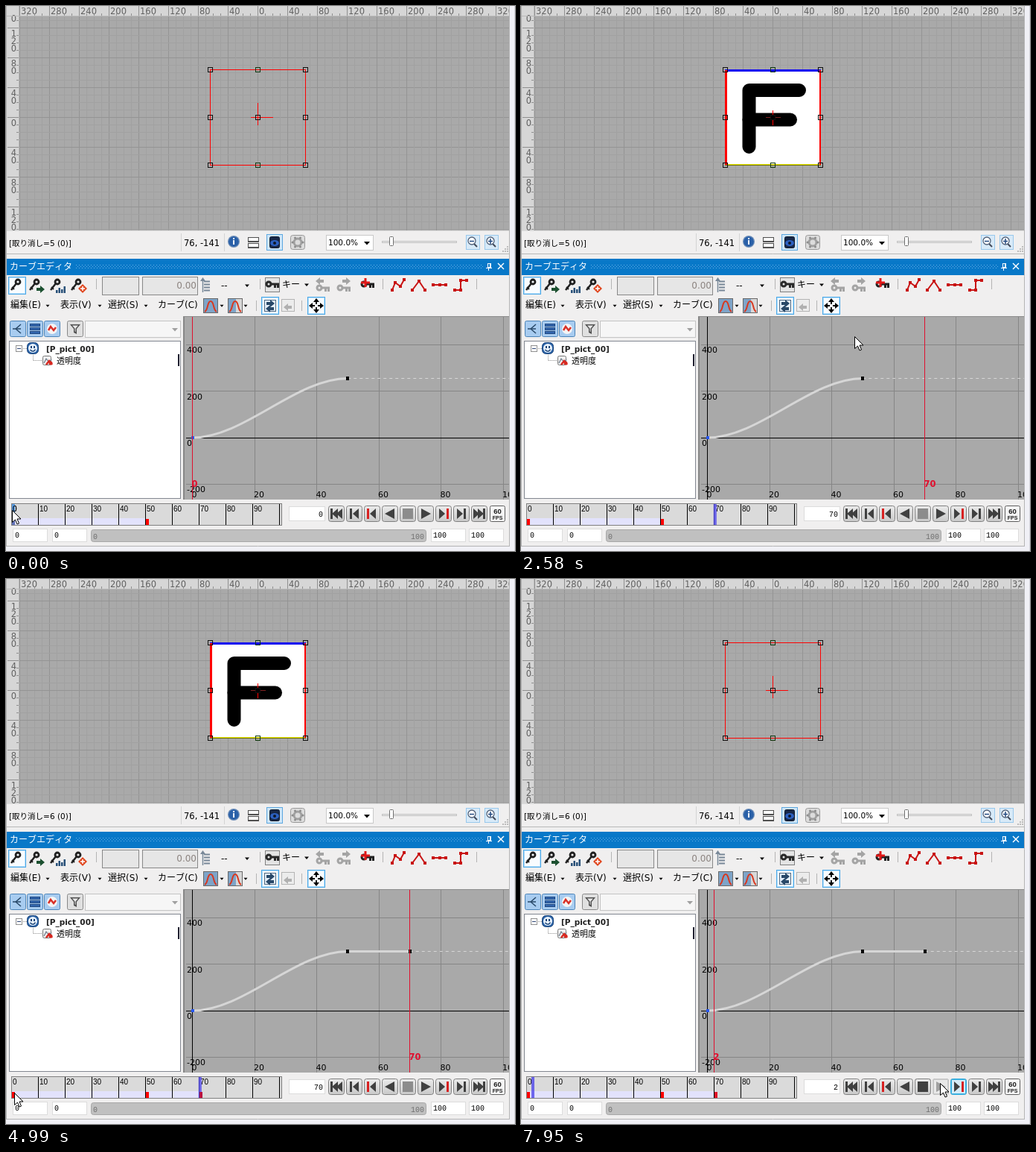
An HTML page with a canvas that plays this animation: 684 by 731 pixels, repeating every 8000 ms.

```html
<!DOCTYPE html>
<html lang="ja">
<head>
<meta charset="utf-8">
<title>カーブエディタ</title>
<style>
html, body { margin: 0; width: 100%; height: 100%; overflow: hidden; background: #f0f0f0; }
canvas { display: block; }
</style>
</head>
<body>
<canvas id="stage" width="684" height="731"></canvas>
<script>
const W = 684, H = 731, LOOP = 8000, STEP = 77.9;
const UI = "'DejaVu Sans','Noto Sans CJK JP','Noto Sans CJK',sans-serif";
const SMALL = "'Liberation Sans',sans-serif";
const MONO = "'Liberation Mono',monospace";
const RED = '#c81414', DARK = '#404040';
const screen = document.getElementById('stage').getContext('2d');
const base = document.createElement('canvas');
base.width = W; base.height = H;
let g = base.getContext('2d');

// Drawing helpers
function box(x, y, w, h, fill, edge) {
  if (fill) { g.fillStyle = fill; g.fillRect(x, y, w, h); }
  if (edge) { g.strokeStyle = edge; g.lineWidth = 1; g.strokeRect(x + .5, y + .5, w - 1, h - 1); }
}
function round(x, y, w, h, r, fill, edge) {
  g.beginPath(); g.roundRect(x + .5, y + .5, w - 1, h - 1, r);
  g.fillStyle = fill; g.fill();
  g.strokeStyle = edge; g.lineWidth = 1; g.stroke();
}
function trace(p) {
  g.beginPath();
  for (let i = 0; i < p.length; i += 2) g.lineTo(p[i], p[i + 1]);
}
function line(p, color, w = 1, dash = []) {
  trace(p);
  g.strokeStyle = color; g.lineWidth = w; g.setLineDash(dash); g.stroke(); g.setLineDash([]);
}
function poly(p, color) { trace(p); g.closePath(); g.fillStyle = color; g.fill(); }
function disc(x, y, r, color) { g.beginPath(); g.arc(x, y, r, 0, 7); g.fillStyle = color; g.fill(); }
function ring(x, y, r, color, w) { g.beginPath(); g.arc(x, y, r, 0, 7); g.strokeStyle = color; g.lineWidth = w; g.stroke(); }
function text(s, x, y, size, color = '#000', font = UI, align = 'left', weight = '') {
  g.font = `${weight} ${size}px ${font}`;
  g.textAlign = align; g.fillStyle = color; g.fillText(s, x, y);
}
function shade(y, h, a, b) {
  const s = g.createLinearGradient(0, y, 0, y + h);
  s.addColorStop(0, a); s.addColorStop(1, b);
  return s;
}
const drop = (x, y, c = '#000', r = 3) => poly([x - r, y - r / 2, x + r, y - r / 2, x, y + r / 2 + .5], c);
const divider = (x, y) => line([x + .5, y, x + .5, y + 14], '#b4b4b4');
const picked = (x, y, w = 24) => { box(x, y, w, 24, '#f8fcff', '#4aa8e8'); box(x + 1, y + 1, w - 2, 22, null, '#b8e0fa'); };
function slantKey(x, y) {
  ring(x + 3, y - 4, 3, '#202020', 2.8);
  line([x + 1, y - 2, x - 6, y + 7], '#202020', 2.5);
  line([x - 5, y + 3, x - 2, y + 6], '#202020', 2);
}
function flatKey(x, y, c) {
  ring(x + 4, y, 3, c, 3);
  line([x + 8, y, x + 18, y], c, 3);
  line([x + 12.5, y, x + 12.5, y + 5], c, 3);
  line([x + 16.5, y, x + 16.5, y + 5], c, 3);
}
function arrow(x, y, d, c) {
  poly([x - 5 * d, y - 2, x, y - 2, x, y - 5, x + 6 * d, y, x, y + 5, x, y + 2, x - 5 * d, y + 2], c);
}

function drawStage() {
  box(1, 0, 675, 302, '#a9a9a9');
  for (let i = -34; i <= 34; i++) {
    const x = 338.5 + i * 10, y = 149.5 + i * 10, c = i % 4 ? '#a1a1a1' : '#949494';
    if (x > 18) line([x, 13, x, 301], c);
    if (y > 13 && y < 301) line([18, y, 676, y], c);
  }
  box(1, 0, 675, 13, '#d6d6d6');
  box(1, 0, 17, 301, '#d6d6d6');
  for (let i = -32; i <= 33; i++) {
    const x = 338.5 + i * 10, y = 149.5 + i * 10, major = i % 4 === 0;
    line([x, major ? 0 : 10, x, 13], '#909090');
    if (y > 13 && y < 301) line([major ? 2 : 14, y, 18, y], '#909090');
    if (!major) continue;
    const label = String(Math.abs(i * 10));
    text(label, x + 1.5, 11, 11.5, '#606060');
    if (Math.abs(i) <= 16) [...label].forEach((d, k) => {
      const b = y + 11 + k * 10;
      if (b > 14 && b < 306) text(d, 10.5, b, 11.5, '#606060', UI, 'center');
    });
  }
  line([1, 13.5, 676, 13.5], '#b8b8b8');
  line([17.5, 0, 17.5, 301], '#b8b8b8');
  box(0, 301, W, 38, '#f0efef');
  line([1, 301.5, 676, 301.5], '#dcdcdc');
}

function drawStatus() {
  for (const x of [235.5, 293.5]) line([x, 305, x, 329], '#d4d4d4');
  text('76, -141', 239, 322, 11.5);
  disc(306, 316, 8, '#6f8fb8'); disc(306, 316, 6.8, '#2a60a8');
  box(305, 311, 2, 2, '#fff'); box(305, 314, 2, 6, '#fff');
  for (const y of [310, 318]) box(325, y, 15, 7, '#fafafa', '#505050');
  box(325, 315, 15, 2, '#505050'); box(325, 323, 15, 2, '#505050');
  box(350, 306, 22, 22, '#cfe6f8', '#5ca8e0');
  round(354, 309, 14, 16, 2, '#182848', '#101828');
  g.beginPath(); g.ellipse(361, 318, 6, 4, 0, 0, 7); g.fillStyle = '#2c60c0'; g.fill();
  disc(361, 318, 2, '#101828');
  round(382, 307, 20, 20, 3, '#dcdcdc', '#989898');
  ring(392, 317, 5, '#a0a0a0', 3);
  for (let k = 0; k < 6; k++) disc(392 + 7 * Math.cos(k * 1.047), 317 + 7 * Math.sin(k * 1.047), 1.5, '#8c8c8c');
  box(430, 307, 64, 21, '#fff', '#c8c8c8');
  text('100.0%', 433, 321, 10.5); drop(485, 318, '#000', 4);
  box(505, 315, 101, 3, '#e4e4e4', '#c4c4c4');
  round(515, 309, 6, 13, 1, '#fff', '#707070');
  for (const x of [618, 643]) {
    box(x, 307, 19, 20, '#d8eaf8', '#98c8ec');
    line([x + 11, 319, x + 15, 323], '#404858', 2);
    disc(x + 8, 315, 5, '#fff'); ring(x + 8, 315, 5, '#506078', 1.3);
    line([x + 5, 315.5, x + 11, 315.5], '#204880', 1.5);
    if (x > 630) line([x + 8, 312, x + 8, 319], '#204880', 1.5);
  }
  for (let i = 0; i < 3; i++) for (let j = 0; j <= i; j++) box(673 - j * 3, 322 + i * 3, 2, 2, '#bcbcbc');
  line([0, 332.5, 677, 332.5], '#b8b8b8');
}

function drawTitle() {
  box(1, 339, 675, 22, '#0878c8');
  text('カーブエディタ', 5, 354, 12, '#fff');
  for (let x = 94; x < 640; x += 4) {
    box(x, 347, 1, 1, '#62b0e6'); box(x + 2, 349, 1, 1, '#62b0e6'); box(x, 351, 1, 1, '#62b0e6');
  }
  box(647, 345, 5, 6, null, '#fff'); box(650, 345, 1, 6, '#fff');
  line([645, 351.5, 653, 351.5], '#fff'); line([648.5, 352, 648.5, 355], '#fff');
  line([661, 345, 669, 353], '#fff', 1.5); line([669, 345, 661, 353], '#fff', 1.5);
}

function drawTools() {
  picked(3, 363);
  [13, 38, 66, 94].forEach(x => slantKey(x, 374));
  arrow(46, 380, 1, '#1c5030');
  [4, 7, 5, 9].forEach((h, i) => box(67 + i * 3.5, 385 - h, 2.5, h, '#285078'));
  poly([103, 373, 109, 379, 103, 385, 97, 379], '#e04820');
  line([103, 376, 103, 382], '#fff', 1.5); line([100, 379, 106, 379], '#fff', 1.5);
  [121, 341, 506, 632].forEach(x => divider(x, 366));
  box(129, 363, 50, 25, '#e6e6e6', '#888');
  box(183, 363, 75, 25, '#e6e6e6', '#888');
  text('0.00', 256, 379, 12, '#8c8480', UI, 'right');
  for (let y = 369; y < 384; y += 4) line([266, y + .5, 274, y + .5], '#788898', 2);
  line([264.5, 366, 264.5, 384], '#788898', 1.5); poly([261, 369, 264.5, 364, 268, 369], '#788898');
  text('--', 289, 379, 12); drop(324, 375);
  box(348, 364, 20, 20, '#e4e4e4', '#808080'); flatKey(349, 373, '#282828');
  text('キー', 371, 378, 12); drop(404, 374);
  flatKey(417, 378, '#a4a4a4'); arrow(422, 369, -1, '#a4a4a4');
  flatKey(445, 378, '#a4a4a4'); arrow(457, 369, 1, '#a4a4a4');
  const curves = [[519, 381, 523, 371, 530, 376, 535, 367], [546, 381, 555, 369, 563, 381],
    [574, 374, 583, 374, 591, 374], [603, 381, 611, 381, 611, 368, 619, 368]];
  for (const c of curves) {
    line(c, RED, 2);
    for (let i = 0; i < c.length; i += 2) box(c[i] - 2, c[i + 1] - 2, 4, 4, RED);
  }
  [['編集(E)', 6], ['表示(V)', 73], ['選択(S)', 137], ['カーブ(C)', 204]].forEach(([s, x]) => text(s, x, 405, 12));
  [56, 126, 188, 290, 322].forEach(x => drop(x, 402, '#000', 2.5));
  for (const x of [265, 298]) {
    box(x, 392, 20, 20, '#7ea4c8', '#686868');
    if (x > 270) box(x + 11, 393, 8, 18, '#d8d8d8');
    g.beginPath(); g.moveTo(x + 2, 410);
    g.bezierCurveTo(x + 7, 408, x + 5, 396, x + 10, 396);
    g.bezierCurveTo(x + 15, 396, x + 13, 408, x + 18, 410);
    g.strokeStyle = '#d83820'; g.lineWidth = 2; g.stroke();
  }
  divider(336, 395); divider(397, 395);
  picked(343, 390);
  box(347, 394, 16, 16, '#e4eef8', '#506880');
  arrow(355, 399, 1, '#284868'); arrow(355, 406, -1, '#284868');
  box(370, 393, 18, 17, '#ececec', '#b4b4b4'); arrow(379, 404, -1, '#b0b0b0');
  picked(405, 390);
  for (let k = 0; k < 4; k++) {
    g.save(); g.translate(417, 402); g.rotate(k * Math.PI / 2);
    poly([5, -4, 10, 0, 5, 4], '#000'); box(2, -1, 3, 2, '#000');
    g.restore();
  }
}

function drawTree() {
  [5, 28, 51, 82].forEach((x, i) => round(x, 422, 22, 22, 2, i < 3 ? '#a8ccf0' : '#e0e0e0', i < 3 ? '#4c84b8' : '#888'));
  line([9, 433, 13, 433, 20, 427], '#284868', 1.5); line([13, 433, 20, 433], '#284868', 1.5); line([13, 433, 20, 439], '#284868', 1.5);
  for (let y = 426; y < 440; y += 5) box(32, y, 14, 4, '#3468b0', '#204880');
  disc(62, 433, 7, '#f4f4f4');
  line([57, 435, 60, 430, 64, 435, 67, 431], '#d83028', 2.5);
  poly([86, 427, 100, 427, 95, 433, 95, 440, 91, 438, 91, 433], '#505050');
  poly([89, 428.5, 97, 428.5, 93.5, 432.5, 93.5, 437, 92.5, 436.5, 92.5, 432.5], '#e8e8e8');
  box(106, 422, 129, 23, '#f6f6f6', '#c4c4c4'); drop(227, 434, '#a0a0a0', 4);
  box(4, 449, 231, 212, '#fff', '#828790');
  box(231, 467, 2, 16, '#202030');
  box(13, 455, 9, 9, '#fff', '#909090'); line([15, 459.5, 20, 459.5], '#304878');
  line([23, 459.5, 28, 459.5], '#909090', 1, [1, 1]);
  line([36.5, 468, 36.5, 475.5, 48, 475.5], '#909090', 1, [1, 1]);
  round(28, 451, 16, 16, 5, '#2c64a8', '#1c4478');
  disc(36, 459, 6, '#e8f2fc'); box(33, 456, 2, 3, '#1c4478'); box(37, 456, 2, 3, '#1c4478');
  g.beginPath(); g.arc(36, 459.5, 3.5, .3, 2.8); g.strokeStyle = '#1c4478'; g.lineWidth = 1.5; g.stroke();
  text('[P_pict_00]', 54, 464, 10.5, '#202020', UI, 'left', 'bold');
  round(49, 469, 12, 13, 2, '#f0f0f0', '#787878');
  line([51, 479, 54, 473, 58, 478, 61, 474], '#687888', 1.2);
  line([54, 481, 58, 476, 62, 481], '#d82820', 2.5); disc(60, 479, 2.5, '#d82820');
  text('透明度', 68, 480, 11);
}

const gx = n => 250.5 + n * 4.175, gy = v => 579 - v * .312;

function drawGraph() {
  box(238, 416, 438, 246, '#a9a9a9');
  box(238, 416, 2, 246, '#868686');
  box(238, 416, 438, 1, '#8c8c8c');
  for (let n = 20; n <= 100; n += 20) {
    const x = Math.floor(gx(n)) + .5;
    line([x, 417, x, 662], '#868686');
  }
  for (const v of [400, 200, -200]) {
    const y = Math.floor(gy(v)) + .5;
    line([242, y, 676, y], '#868686');
  }
  line([242, 579.5, 676, 579.5], '#000'); line([250.5, 417, 250.5, 662], '#000');
  [400, 200, 0, -200].forEach(v => text(v, 243, gy(v) + 11, 11));
  for (let n = 0; n <= 100; n += 20) text(n, gx(n) - 1, 659, 11);
  g.beginPath(); g.moveTo(gx(0), gy(0));
  g.bezierCurveTo(gx(50 / 3), gy(0), gx(100 / 3), gy(255), gx(50), gy(255));
  g.strokeStyle = '#d6d6d6'; g.lineWidth = 3; g.stroke();
  box(249, 577, 4, 4, '#2858f0');
}

function navButton(i, kind, fill, edge, ink = DARK) {
  const x = 433 + i * 24, c = x + 11, y = 681;
  round(x, 670, 22, 22, 3, fill || shade(670, 22, '#ececec', '#c8c8c8'), edge || '#808080');
  if (edge) box(x + 1, 671, 20, 20, null, edge);
  const left = a => poly([a + 8, y - 7, a, y, a + 8, y + 7], ink);
  const right = a => poly([a, y - 7, a + 8, y, a, y + 7], ink);
  const bar = (a, col = ink) => box(a, y - 7, 3, 14, col);
  ({
    first() { bar(x + 3); left(x + 5); left(x + 11); },
    prev() { bar(x + 5); left(x + 9); },
    prevKey() { bar(x + 4, '#d82020'); left(x + 8); },
    back() { poly([c - 7, y, c + 6, y - 7, c + 6, y + 7], ink); },
    stop() { box(c - 7, y - 7, 14, 14, ink); },
    play() { poly([c + 7, y, c - 6, y - 7, c - 6, y + 7], ink); },
    nextKey() { right(x + 5); bar(x + 15, '#d82020'); },
    next() { right(x + 5); bar(x + 14); },
    last() { right(x + 3); right(x + 9); bar(x + 16); }
  })[kind]();
}

function drawFooter() {
  ['first', 'prev', 'prevKey', 'back', 'stop', 'play', 'nextKey', 'next', 'last']
    .forEach((k, i) => navButton(i, k, null, null, k === 'stop' ? '#8c8c8c' : DARK));
  round(650, 670, 21, 22, 2, '#f4f4f4', '#606060');
  text('60', 660.5, 681, 9.5, '#202020', SMALL, 'center', 'bold');
  text('FPS', 660.5, 689, 7, '#202020', SMALL, 'center', 'bold');
  box(380, 671, 49, 20, '#fff', '#dcdcdc');
  round(114, 702, 451, 17, 3, '#c0c0c0', '#a8a8a8');
  text('0', 117, 715, 10, '#707070', MONO); text('100', 562, 715, 10, '#707070', MONO, 'right');
  [[9, '0'], [62, '0'], [571, '100'], [622, '100']].forEach(([x, s]) => {
    box(x, 701, 47, 18, '#fff', '#dcdcdc'); text(s, x + 3, 713, 10, '#000', MONO);
  });
  line([0, 724.5, 677, 724.5], '#b4b4b4');
  box(0, 725, W, 6, '#f0f0f6');
}

function drawBase() {
  box(0, 0, W, H, '#f0efef');
  drawStage(); drawStatus(); drawTitle(); drawTools(); drawTree(); drawGraph(); drawFooter();
  box(676, 0, 8, H, '#f0f0f6');
  line([676.5, 0, 676.5, 725], '#b4b4b4'); line([683.5, 0, 683.5, H], '#d8d8e0');
  line([.5, 0, .5, 725], '#b4b4b4');
}

// Motion: [step, value...]
const frames = [[0, 0], [1, 2], [2, 8], [4, 27], [6, 43], [8, 55], [11, 66], [13, 68], [15, 68], [17, 70],
  [64, 70], [65, 1], [83, 1], [84, 0], [101, 0], [102, 2]];
const pointer = [[0, 8, 676], [1, 16, 678], [2, 38, 680], [4, 106, 683], [6, 164, 684], [8, 207, 685], [11, 247, 687],
  [17, 262, 688], [28, 262, 688], [33, 448, 443], [35, 448, 443], [36, 451, 456], [38, 480, 410], [40, 497, 376],
  [41, 484, 365], [46, 484, 365], [49, 380, 480], [52, 130, 690], [54, 45, 712], [58, 11, 697], [59, 11, 697],
  [61, 16, 693], [64, 11, 689], [67, 11, 689], [70, 84, 685], [72, 30, 686], [77, 11, 687], [79, 6, 687],
  [86, 6, 687], [88, 40, 705], [90, 150, 709], [94, 420, 700], [97, 560, 684], [100, 563, 676]];
function sample(keys, k) {
  const i = keys.findIndex(p => p[0] > k);
  if (i < 0) return keys[keys.length - 1].slice(1);
  const a = keys[i - 1], b = keys[i], u = (k - a[0]) / (b[0] - a[0]);
  return a.slice(1).map((v, j) => Math.round(v + (b[j + 1] - v) * u));
}

function drawPicture(frame) {
  const u = Math.min(frame / 50, 1), alpha = u * u * (3 - 2 * u);
  box(274, 85, 129, 129, null, '#f00');
  g.globalAlpha = alpha;
  box(274, 85, 129, 129, '#fff');
  g.globalAlpha = alpha ** 3;
  g.lineCap = g.lineJoin = 'round';
  line([374, 113, 306.5, 113, 306.5, 189], '#000', 18);
  line([306.5, 152.5, 362, 152.5], '#000', 18);
  g.lineCap = 'butt'; g.lineJoin = 'miter';
  g.globalAlpha = alpha;
  box(274, 85, 129, 3, '#1008f0');
  box(274, 212, 129, 2, '#e8e800'); box(274, 213, 129, 1, '#707000');
  box(274, 86, 3, 127, '#f00'); box(401, 86, 2, 127, '#f00');
  g.globalAlpha = 1;
  line([274.5, 86, 274.5, 213], '#f00'); line([402.5, 86, 402.5, 213], '#f00');
  if (alpha < .5) {
    line([338.5, 130, 338.5, 160], '#f00'); line([329, 149.5, 359, 149.5], '#f00');
  } else {
    line([338.5, 140, 338.5, 147], '#f00'); line([338.5, 152, 338.5, 160], '#f00');
    line([329, 149.5, 335, 149.5], '#802020'); line([342, 149.5, 349, 149.5], '#802020');
  }
  for (const x of [271, 335, 399]) for (const y of [82, 146, 210])
    box(x, y, 7, 7, null, x === 335 && y !== 146 ? '#103810' : '#101010');
}

function drawPlayhead(frame, keyed) {
  const end = keyed ? 70 : 50, x = Math.round(gx(frame) - .3) + .5, y = gy(255);
  if (keyed) line([gx(50), y, gx(70), y], '#d6d6d6', 3);
  line([gx(end), 499.5, 676, 499.5], '#d6d6d6', 1, [4, 4]);
  for (const n of keyed ? [50, 70] : [50]) box(Math.round(gx(n)) - 2, 497, 4, 5, '#000');
  line([x, 417, x, 662], '#e0102e');
  text(frame, x - 1, 645, 11.5, '#e0102e', UI, 'left', 'bold');

  box(7, 667, 364, 30, '#dadada', '#808080');
  box(8, 687, end * 3.6, 9, '#e2e2fc');
  for (let n = 0; n <= 100; n += 10) {
    if (n) box(7 + n * 3.6, 668, 1, 28, '#000');
    if (n < 100) text(n, 9 + n * 3.6, 678, 10, '#000', SMALL);
  }
  for (const n of keyed ? [0, 50, 70] : [0, 50]) box(8 + n * 3.6, 688, 4, 8, n === 70 ? '#e01028' : '#f00');
  const px = Math.max(8, 6.8 + frame * 3.6);
  g.globalAlpha = .8; box(px, 668, 4, 28, frame ? '#5048ec' : '#3c90e8'); g.globalAlpha = 1;
  if (frame === 70 && keyed) box(260, 688, 4, 8, '#b81040');
  if (!frame) text('0', 9, 678, 10, '#000', SMALL);
  text(frame, 426, 685, 10, '#000', MONO, 'right');
}

function drawCursor(x, y) {
  const shape = [0, 0, 0, 16, 4, 12.5, 6.5, 18.5, 9, 17.5, 6.5, 11.5, 11.5, 11.5].map((v, i) => v + (i % 2 ? y : x) + .5);
  poly(shape, '#fff');
  trace(shape); g.closePath(); g.strokeStyle = '#000'; g.lineWidth = 1; g.stroke();
}

function render(ms) {
  const k = Math.floor((ms % LOOP) / STEP), keyed = k >= 44;
  const [frame] = sample(frames, k), [mx, my] = sample(pointer, k);
  g.drawImage(base, 0, 0);
  drawPicture(frame);
  text(`[取り消し=${keyed ? 6 : 5} (0)]`, 4, 322, 10.5);
  drawPlayhead(frame, keyed);
  if (k >= 40 && k <= 46) box(475, 362, 24, 24, '#c4e4fa', '#3c9ce4');
  flatKey(477, 373, '#202020');
  line([483, 365, 483, 377], '#e01818', 3); line([477, 371, 489, 371], '#e01818', 3);
  if (k >= 45 && k <= 48) {
    box(486, 401, 60, 22, 'rgba(0,0,0,.25)');
    round(484, 398, 60, 22, 2, shade(398, 22, '#fff', '#e4e5f0'), '#767676');
    text('キー作成', 489, 413, 12, '#575757');
  }
  if (k >= 102) {
    navButton(4, 'stop');
    navButton(5, 'play', '#e8e8e8', '#c8c8c8', '#a0a0a0');
    navButton(6, 'nextKey', '#d4ecf8', '#38b0e0');
  } else if (k >= 98) navButton(5, 'play', '#d4ecf8', '#38b0e0');
  if (k < 73 || k > 76) drawCursor(mx, my);
}

drawBase();
g = screen;
const start = performance.now();
function tick() {
  render(performance.now() - start);
  requestAnimationFrame(tick);
}
tick();
</script>
</body>
</html>
```
